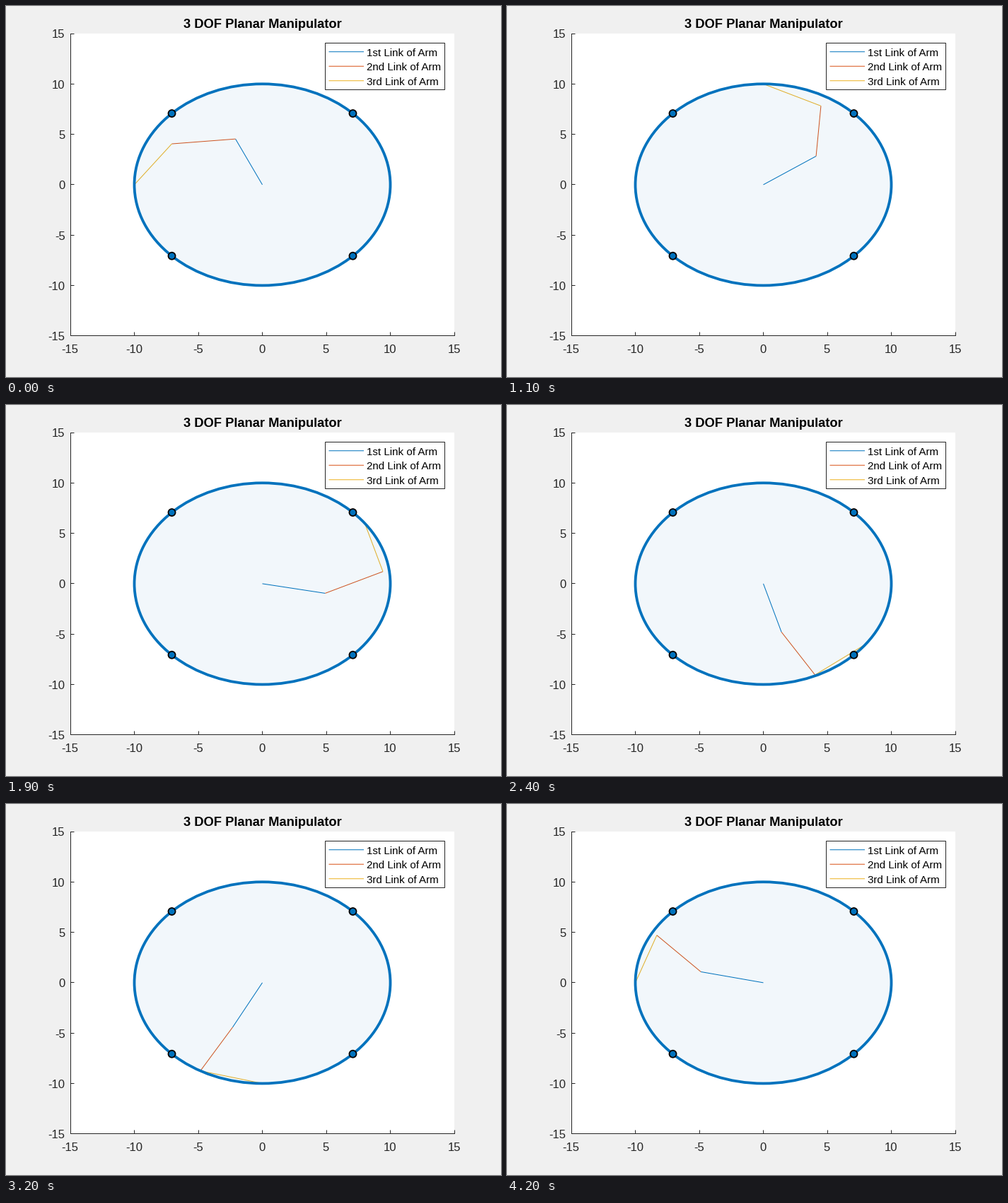
A matplotlib script that plays this animation: 700 px wide and 525 px high, repeating every 4.3 s.

```python
import numpy as np
import matplotlib.pyplot as plt
from matplotlib.animation import FuncAnimation
from matplotlib.patches import Ellipse, Rectangle

W, H, DPI = 700, 525, 100
LEFT, TOP, RIGHT, BOTTOM = 91, 39, 634, 466.75
INK = "#262626"
BLUE, ORANGE, YELLOW = "#0072BD", "#D95319", "#EDB120"
PT = 72 / DPI  # points per pixel

LINK, RADIUS = 5, 10
LAST = 41
# Base joint angle relative to the tip's bearing, drifting over the lap
KEY_STEPS = (0, 6, 14, 23, 31, 35, LAST)
KEY_LAGS = (-65.2, -58.7, -52.3, -36.7, -27.7, -24.1, -12.5)

plt.rcParams["font.family"] = "Liberation Sans"
fig = plt.figure(figsize=(W / DPI, H / DPI), dpi=DPI, facecolor="#F0F0F0")
ax = fig.add_axes([0, 0, 1, 1])
ax.set_xlim(0, W)
ax.set_ylim(H, 0)
ax.axis("off")


def to_px(x, y):
    """Plot units to stage pixels."""
    return (LEFT + (x + 15) * (RIGHT - LEFT) / 30,
            BOTTOM - (y + 15) * (BOTTOM - TOP) / 30)


def line(xs, ys, color, width=1.0, z=2):
    return ax.plot(xs, ys, color=color, lw=width * PT, zorder=z,
                   solid_capstyle="butt", snap=False)[0]


def box(x, y, w, h, **kw):
    ax.add_patch(Rectangle((x, y), w, h, fc="white", snap=False, **kw))


def label(x, y, text, size, color=INK, **kw):
    ax.text(x, y, text, fontsize=size * PT, color=color, va="baseline",
            zorder=8, **kw)


def draw_axes():
    box(LEFT, TOP, RIGHT - LEFT, 428, ec="none", zorder=0)
    x0, y0 = LEFT + 0.5, 466.5
    line([x0, x0], [TOP, y0 + 0.5], INK, z=7)
    line([LEFT, RIGHT + 1], [y0, y0], INK, z=7)
    for v in range(-15, 16, 5):
        x, y = to_px(v, v)
        tx, ty = np.floor(x) + 0.5, np.floor(y) + 0.5
        line([tx, tx], [y0, y0 - 5], INK, z=7)
        line([x0, x0 + 5], [ty, ty], INK, z=7)
        label(x - 0.5, 491, str(v), 16.67, ha="center")
        label(83.5, y + 6.4, str(v), 16.67, ha="right")
    label(363, 31, "3 DOF Planar Manipulator", 18.33, "black",
          ha="center", weight="bold")


def draw_legend():
    box(451.5, 52.5, 169, 66, ec=INK, lw=PT, zorder=7)
    for i, (name, color) in enumerate(zip(("1st", "2nd", "3rd"),
                                          (BLUE, ORANGE, YELLOW))):
        y = 64.75 + 20.5 * i
        line([456.5, 506], [y, y], color, z=8)
        label(510, y + 6, name + " Link of Arm", 15.1, "black")


def draw_region():
    cx, cy = to_px(0, 0)
    right, top = to_px(RADIUS, RADIUS)
    size = dict(width=2 * (right - cx), height=2 * (cy - top))
    ax.add_patch(Ellipse((cx, cy), fc=BLUE, ec="none", alpha=0.05, zorder=4, **size))
    ax.add_patch(Ellipse((cx, cy), fc="none", ec=BLUE, lw=3.8 * PT, zorder=5, **size))
    d = RADIUS / np.sqrt(2)
    for sx in (-d, d):
        for sy in (-d, d):
            ax.add_patch(Ellipse(to_px(sx, sy), 10, 10, fc=BLUE, ec="black",
                                 lw=1.8 * PT, zorder=6))


def travel(step):
    """Clockwise angle covered by the tip, whose x moves one unit per step."""
    if step <= 20:
        return np.arccos((10 - step) / RADIUS)
    return 2 * np.pi - np.arccos((step - 31) / RADIUS)


KEY_TRAVEL = [travel(s) for s in KEY_STEPS]


def joints(step):
    """Base, two elbows and tip as complex numbers."""
    s = travel(step)
    bearing = np.pi - s
    tip = RADIUS * np.exp(1j * bearing)
    lag = np.radians(np.interp(s, KEY_TRAVEL, KEY_LAGS))
    first = LINK * np.exp(1j * (bearing + lag))
    reach = tip - first
    bend = np.arccos(abs(reach) / (2 * LINK))
    second = first + LINK * np.exp(1j * (np.angle(reach) - bend))
    return np.array([0, first, second, tip])


draw_axes()
draw_region()
draw_legend()
links = [line([], [], c, z=3) for c in (BLUE, ORANGE, YELLOW)]


def update(n):
    # The first pose is held for two frames
    p = joints(max(n - 1, 0))
    xs, ys = to_px(p.real, p.imag)
    for i, link in enumerate(links):
        link.set_data(xs[i:i + 2], ys[i:i + 2])
    return links


anim = FuncAnimation(fig, update, frames=LAST + 2, interval=100, repeat=True)
plt.show()
```
